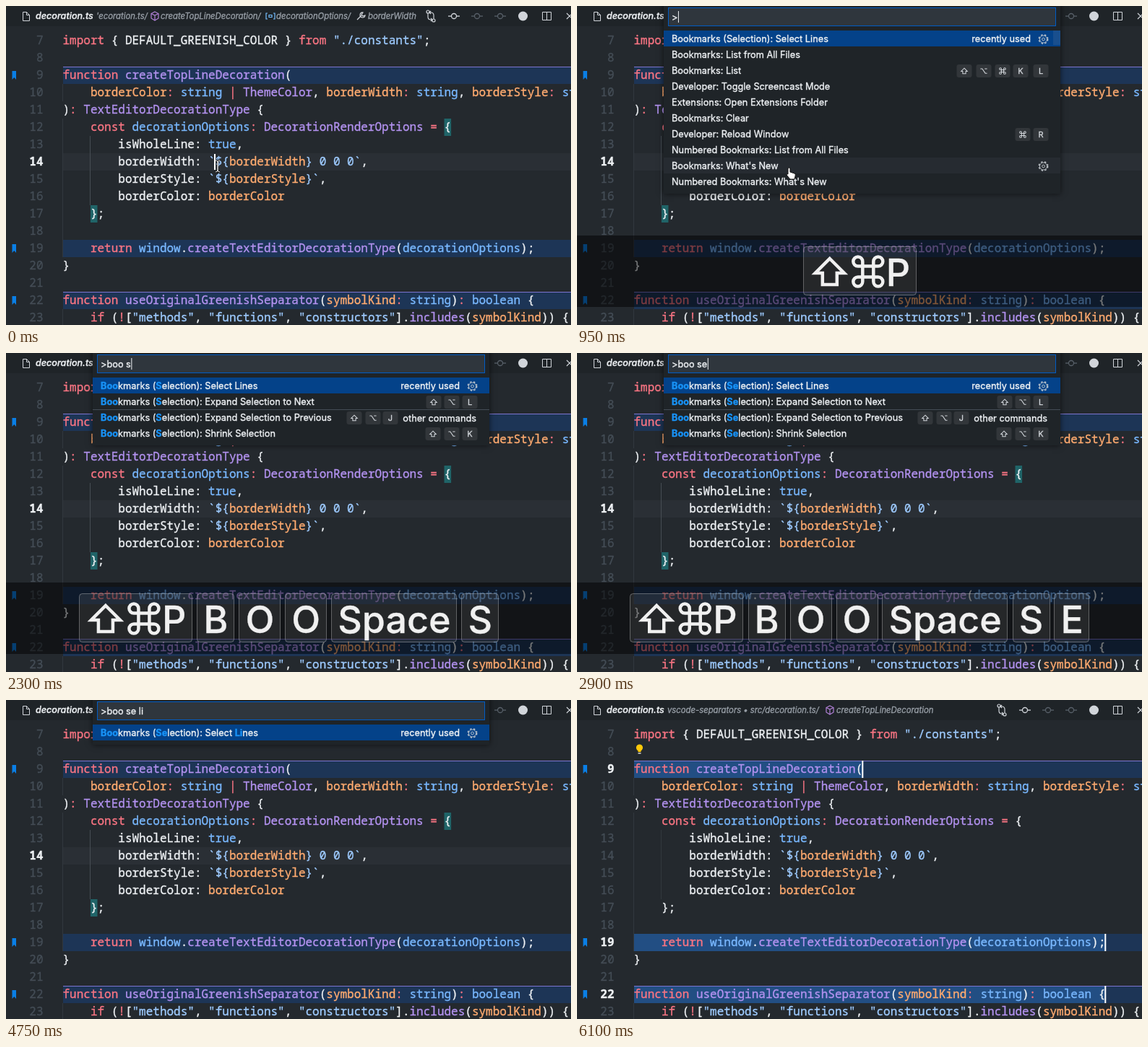
An HTML page with a canvas that plays this animation: 782 px wide and 442 px high, repeating every 6150 ms.

```html
<!DOCTYPE html>
<html lang="en">
<head>
<meta charset="utf-8">
<title>Select lines</title>
<style>
html, body { margin: 0; width: 100%; height: 100%; overflow: hidden; background: #24292e; }
canvas { display: block; }
</style>
</head>
<body>
<canvas id="stage" width="782" height="442"></canvas>
<script>
const ctx = document.getElementById('stage').getContext('2d');
const LOOP = 6150, CHAR = 9.6, LEFT = 78.5, FIRST = 7;
const MONO = '500 16px "Noto Sans Mono", monospace';
const ui = (size, style = '') => `${style} ${size}px Inter, sans-serif`;
const LABEL = ui(12.75), WHITE = '#eef1f4';
const INK = { w: WHITE, r: '#f97583', p: '#b392f0', b: '#79b8ff', s: '#9ecbff', o: '#ffab70' };

// "~" starts a token, the next letter is its colour
const code = [
  '~rimport ~w{ DEFAULT_GREENISH_COLOR } ~rfrom ~s"./constants"~w;',
  '',
  '~rfunction ~pcreateTopLineDecoration~w(',
  '~w    ~oborderColor~r: ~bstring ~r| ~pThemeColor~w, ~oborderWidth~r: ~bstring~w, ~oborderStyle~r: ~bstring',
  '~w)~r: ~pTextEditorDecorationType ~w{',
  '~w    ~rconst ~bdecorationOptions~r: ~pDecorationRenderOptions ~r= ~w{',
  '~w        isWholeLine: ~btrue~w,',
  '~w        borderWidth: ~s`${~oborderWidth~s} 0 0 0`~w,',
  '~w        borderStyle: ~s`${~oborderStyle~s}`~w,',
  '~w        borderColor: ~oborderColor',
  '~w    };',
  '',
  '~w    ~rreturn ~bwindow~w.~pcreateTextEditorDecorationType~w(~bdecorationOptions~w);',
  '~w}',
  '',
  '~rfunction ~puseOriginalGreenishSeparator~w(~osymbolKind~r: ~bstring~w)~r: ~bboolean ~w{',
  '~w    ~rif ~w(~r!~w[~s"methods"~w, ~s"functions"~w, ~s"constructors"~w].~pincludes~w(~osymbolKind~w)) {',
];
const marked = { 9: 33, 19: 68, 22: 68 };   // bookmarked line: its length

// time, palette query (null = closed), pressed keys
const steps = [
  [0, null, ''],
  [550, null, '⇧'], [650, null, '⇧⌘'], [750, null, '⇧⌘P'],
  [800, '', '⇧⌘P'],
  [1400, 'b', '⇧⌘P B'], [1600, 'bo', '⇧⌘P B O'], [1950, 'boo', '⇧⌘P B O O'],
  [2150, 'boo ', '⇧⌘P B O O Space'], [2300, 'boo s', '⇧⌘P B O O Space S'],
  [2450, 'boo se', '⇧⌘P B O O Space S E'], [2950, 'boo se ', '⇧⌘P B O O Space S E'],
  [3450, 'boo se ', ''],
  [3700, 'boo se l', 'L'], [4000, 'boo se li', 'L I'], [4650, 'boo se li', ''],
  [4900, 'boo se li', 'Enter'], [4950, null, 'Enter'], [5600, null, ''],
];
const SELECTED = 4950, BULB = 5450;

// label, then hints as key and x
const B = 'Bookmarks: ', N = 'Numbered Bookmarks: ', S = 'Bookmarks (Selection): ';
const top1 = [S + 'Select Lines'];
const listRow = [B + 'List', '⇧536 ⌥563 ⌘589 K614 L642'];
const allRows = [top1, [B + 'List from All Files'], listRow,
  ['Developer: Toggle Screencast Mode'], ['Extensions: Open Extensions Folder'], [B + 'Clear'],
  ['Developer: Reload Window', '⌘617 R642'], [N + 'List from All Files'],
  [B + "What's New"], [N + "What's New"]];
const bookRows = [top1, [B + 'List from All Files'], listRow, [B + 'Clear'],
  [N + 'List from All Files'], [B + "What's New"], [N + "What's New"], [N + 'List'],
  [N + 'Clear'], [B + 'Clear from All Files']];
const selRows = [top1, [S + 'Expand Selection to Next', '⇧592 ⌥617 L642'],
  [S + 'Expand Selection to Previous', '⇧482 ⌥508 J532'], [S + 'Shrink Selection', '⇧591 ⌥617 K642']];
const rowsFor = q => !q ? allRows : q.length < 5 ? bookRows : q.length < 8 ? selRows : [top1];

// 53 units wide, standing on the baseline
const glyphs = {
  '⇧': new Path2D('M28-38L48-18H38V-2H18V-18H8Z'),
  '⌘': new Path2D('M20.5-12.5V-34a6.5 6.5 0 1 0-6.5 6.5H42a6.5 6.5 0 1 0-6.5-6.5V-6a6.5 6.5 0 1 0 6.5-6.5H14a6.5 6.5 0 1 0 6.5 6.5Z'),
  '⌥': new Path2D('M6-34H18L38-5H50M34-34H50'),
};
const fileIcon = new Path2D('M23.5 8.5h5l4 4v8h-9zM28.5 8.5v4h4');
const compare = new Path2D('M584 10v5q0 4 4 4h2m-2-2l2 2-2 2M592 18v-5q0-4-4-4h-2m2-2l-2 2 2 2M582 8a2 2 0 1 0 4 0a2 2 0 1 0-4 0M590 20a2 2 0 1 0 4 0a2 2 0 1 0-4 0');
const split = new Path2D('M742.5 8.5h12v11h-12zM748.5 8.5v11');
const bookmark = new Path2D('M8.5-6h5.5v12l-2.75-3-2.75 3z');
const cube = new Path2D('M0-6L5-3.5V3L0 6-5 3V-3.5ZM-5-3.5L0-1 5-3.5M0-1V6');
const wrench = new Path2D('M-5 5L1-1M3-5a3.5 3.5 0 1 0 3 4l-3 1-2-2z');
const hand = new Path2D('M-2-7q2-2 3 0v5l6 2q2 1 1 4l-1 4h-6l-5-6q0-2 2-1z');

function rect(x, y, w, h, color) { ctx.fillStyle = color; ctx.fillRect(x, y, w, h); }

function stroke(path, color, width = 1, x = 0, y = 0, scale = 1) {
  ctx.save();
  ctx.translate(x, y);
  ctx.scale(scale, scale);
  ctx.strokeStyle = color;
  ctx.lineWidth = width;
  ctx.stroke(path);
  ctx.restore();
}

function fill(path, color, x = 0, y = 0) {
  ctx.save();
  ctx.translate(x, y);
  ctx.fillStyle = color;
  ctx.fill(path);
  ctx.restore();
}

function disc(x, y, r) {
  const path = new Path2D();
  path.arc(x, y, r, 0, 7);
  return path;
}

function box(x, y, w, h, r) {
  const path = new Path2D();
  path.roundRect(x, y, w, h, r);
  return path;
}

// A faint outline gives the text its weight; returns the x where it ends
function text(str, x, y, font, color, align = 'left') {
  ctx.font = font;
  ctx.fillStyle = ctx.strokeStyle = color;
  ctx.lineWidth = .35;
  ctx.textAlign = align;
  ctx.fillText(str, x, y);
  ctx.strokeText(str, x, y);
  return x + ctx.measureText(str).width;
}

const rowTop = n => 36 + (n - FIRST) * 24;
const colX = c => LEFT + c * CHAR;

function editor(t, focused) {
  const done = t >= SELECTED;
  const blink = (done ? t - SELECTED : t) % 1000 < 500;
  if (!done) rect(79, 204, 703, 24, '#2a2f35');
  for (const n in marked) {
    const y = rowTop(n);
    rect(79, y, 703, 24, '#1d3556');
    if (done) rect(79, y, colX(marked[n]) - 79, 24, 'rgba(51,146,255,.267)');
    if (n != 19) rect(79, y, 703, 1, '#7c74cf');
    fill(bookmark, '#0a7fe6', 0, y + 12);
  }
  for (const n of [10, 12, 13, 14, 15, 16, 17, 18, 19, 23]) rect(78, rowTop(n), 1, 24, '#32383e');
  rect(116, rowTop(13), 1, 96, done ? '#32383e' : '#464d54');
  if (!done) {
    rect(colX(55), rowTop(12), CHAR, 24, 'rgba(23,229,230,.314)');
    rect(colX(4), rowTop(17), CHAR, 24, 'rgba(23,229,230,.314)');
  }
  code.forEach((line, i) => {
    const n = FIRST + i, y = rowTop(n) + 17;
    const active = done ? n in marked : n === 14;
    text(n, 51.5, y, active ? MONO.replace('500', '700') : MONO, active ? WHITE : '#444d56', 'right');
    let col = 0;
    for (const token of line.split('~').slice(1)) {
      text(token.slice(1), colX(col), y, MONO, INK[token[0]]);
      col += token.length - 1;
    }
  });
  if (focused && blink) {
    if (done) for (const n in marked) rect(colX(marked[n]) - 1, rowTop(n), 2, 24, '#fff');
    else rect(288, 205, 2, 22, '#fff');
  }
  if (t >= BULB) {
    fill(disc(86.5, 66, 4.6), '#ffc80a');
    rect(84.5, 69, 4, 3, '#ffc80a');
    rect(84.5, 73, 4, 1.5, '#d8dadc');
  }
}

function titleBar(t) {
  const small = ui(11.3, 'italic'), gray = '#969da5', purple = '#b180d7', light = '#d1d5da';
  rect(0, 0, 782, 28, '#1f2428');
  stroke(fileIcon, light);
  text('decoration.ts', 41, 18, ui(12.6, 'italic 500'), WHITE);
  if (t >= SELECTED) {
    text('vscode-separators • src/decoration.ts/', 125, 18, small, gray);
    stroke(cube, purple, 1.2, 350, 14);
    text('createTopLineDecoration', 359, 18, small, gray);
  } else {
    text("'ecoration.ts/", 125, 18, small, gray);
    stroke(cube, purple, 1.2, 206, 14);
    text('createTopLineDecoration/', 214, 18, small, gray);
    stroke(new Path2D('M-4-4H-6V4H-4M4-4H6V4H4M-2-1.5H2V1.5H-2Z'), '#75beff', 1.2, 366, 14);
    text('decorationOptions/', 374, 18, small, gray);
    stroke(wrench, light, 1.2, 491, 14);
    text('borderWidth', 501, 18, small, gray);
  }
  stroke(compare, light, 1.2);
  [[620, light], [652, '#586069'], [684, '#586069']].forEach(([x, color]) => {
    stroke(disc(x, 14, 3.5), color, 1.3);
    rect(x - 8, 13.4, 4.5, 1.3, color);
    rect(x + 3.5, 13.4, 4.5, 1.3, color);
  });
  fill(disc(715.5, 14, 6.5), light);
  stroke(split, light);
  stroke(new Path2D('M776 10l8 8M776 18l8-8'), light, 1.2);
}

function gear(y) {
  ctx.setLineDash([2.5, 2.5]);
  stroke(disc(645.5, y, 6.2), '#c9ced3', 1.4);
  ctx.setLineDash([]);
  stroke(disc(645.5, y, 5), '#c9ced3', .9);
  stroke(disc(645.5, y, 1.9), '#c9ced3', .9);
}

function hint(key, x, y) {
  fill(box(x - 10.5, y - 9, 21, 18, 3), 'rgba(128,128,128,.2)');
  if (glyphs[key]) stroke(glyphs[key], '#d1d5da', 5, x - 5.9, y + 4.2, .21);
  else text(key, x, y + 4, ui(11), '#d1d5da', 'center');
}

// Marks the first word start that matches each part of the query
function label(str, query, y) {
  const parts = query.split(' ').filter(Boolean);
  const pieces = parts.length ? str.split(new RegExp(`\\b(${parts.join('|')})`, 'i')) : [str];
  const seen = new Set();
  let x = 131;
  pieces.forEach((piece, i) => {
    const hit = i % 2 && !seen.has(piece.toLowerCase());
    if (hit) seen.add(piece.toLowerCase());
    x = text(piece, x, y, hit ? '700 ' + LABEL : LABEL, hit ? '#1893f8' : WHITE);
  });
}

function palette(t, query) {
  const rows = rowsFor(query), since = steps.find(s => s[1] === query)[0];
  ctx.save();
  ctx.shadowColor = 'rgba(0,0,0,.6)';
  ctx.shadowBlur = 8;
  rect(120, -10, 549, 50 + rows.length * 22, '#1f2428');
  ctx.restore();
  rect(126, 2, 537, 26, '#005cc5');
  rect(127, 3, 535, 24, '#2f363d');
  const end = text('>' + query, 131, 20, LABEL, WHITE);
  if ((t - since) % 1000 < 500) rect(end + .5, 7, 1, 16, WHITE);

  rect(120, 34, 549, 22, '#044289');
  if (rows.length > 8) {
    rect(120, 210, 549, 22, '#262b31');
    gear(222);
    rect(659, 34, 10, query ? 31 : 20, 'rgba(149,157,165,.15)');
  }
  rows.forEach(([name, keys], i) => {
    const y = 45 + i * 22;
    label(name, query, y + 5);
    if (keys) for (const k of keys.split(' ')) hint(k[0], +k.slice(1), y + 1);
  });
  text('recently used', 628, 50, LABEL, WHITE, 'right');
  gear(46);
  if (rows === selRows) {
    rect(120, 78, 549, 1, '#444d56');
    text('other commands', 651, 95, LABEL, WHITE, 'right');
  }
}

function screencast(keys) {
  const font = ui(52, '500'), pad = 9, gap = 6;
  rect(0, 318, 782, 99, 'rgba(0,0,0,.5)');
  ctx.font = font;
  const size = c => glyphs[c] ? 53 : ctx.measureText(c).width;
  const parts = keys.split(' ').map(k => glyphs[k[0]] ? [...k] : [k]);
  const widths = parts.map(p => p.reduce((sum, c) => sum + size(c), 2 * pad));
  let x = 391.5 - (widths.reduce((a, b) => a + b) + gap * (parts.length - 1)) / 2;
  parts.forEach((part, i) => {
    const shape = box(Math.round(x) + .5, 333.5, Math.round(widths[i]) - 1, 67, 4);
    fill(shape, 'rgba(128,128,128,.17)');
    stroke(shape, 'rgba(204,204,204,.4)');
    let cx = x + pad;
    for (const c of part) {
      if (glyphs[c]) stroke(glyphs[c], '#f0f0f0', 4.5, cx, 388);
      else text(c, cx, 388, font, '#f0f0f0');
      cx += size(c);
    }
    x += widths[i] + gap;
  });
}

function pointer(t) {
  if (t < 800) {
    const beam = new Path2D('M290 214q3 0 3 3v10q0 3-3 3M296 214q-3 0-3 3v10q0 3 3 3');
    stroke(beam, '#111', 2.4);
    stroke(beam, '#e8e8e8', 1);
  } else if (t < 1400) {
    fill(hand, '#fff', 294, 232);
    stroke(hand, '#111', 1, 294, 232);
  }
}

function draw(now) {
  const t = now % LOOP;
  const [, query, keys] = steps.findLast(s => s[0] <= t);
  rect(0, 0, 782, 442, '#24292e');
  editor(t, query === null);
  titleBar(t);
  if (keys) screencast(keys);
  if (query !== null) palette(t, query);
  pointer(t);
}

const start = performance.now();
function tick() {
  draw(performance.now() - start);
  requestAnimationFrame(tick);
}
tick();
</script>
</body>
</html>
```
